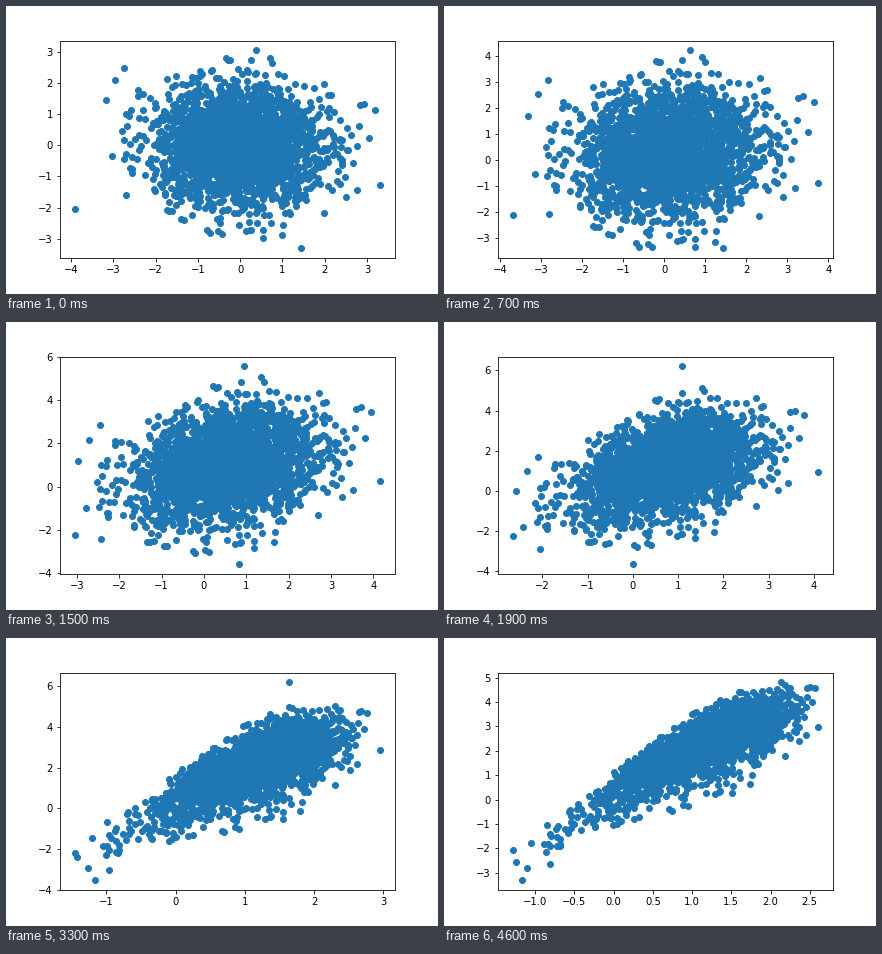
Write a matplotlib script that moves like this. It is 432 px wide and 288 px high and loops after 4.7 s.

```python
import numpy as np
import matplotlib.pyplot as plt
from matplotlib.animation import FuncAnimation

FRAMES = 47
COUNT = 2500


def ramp(p, start, end):
    """Smoothstep from 0 to 1 between start and end."""
    q = np.clip((p - start) / (end - start), 0, 1)
    return q * q * (3 - 2 * q)


def skewed(z, k):
    return z - k * (z * z - 1)


def rim(p):
    """Four stray points that bound the cloud: left, right, bottom, top."""
    fall = np.clip((p - 0.4) / 0.6, 0, 1)
    left = -3.9 + 2.62 * ramp(p, 0, 0.85)
    right = 3.3 + 0.85 * ramp(p, 0, 0.3) - 1.55 * (1 - (1 - fall) ** 2)
    bottom = -3.3 - 0.38 * np.sin(np.pi * p) ** 2
    top = min(3.04 + 7.7 * p, 6.2) - 1.4 * ramp(p, 0.7, 1)
    return np.array([
        (left, 0.62 * bottom),
        (right, -1.27 + 4.24 * ramp(p, 0, 0.8)),
        (1.43 - 2.6 * ramp(p, 0.2, 0.6), bottom),
        (0.37 + 1.76 * p, top),
    ])


def cloud(p, u, w):
    """Bend a round Gaussian (u, w) into a slanted, curved band."""
    grow = ramp(p, 0, 0.25)
    bend = ramp(p, 0.2, 0.85)
    thin = ramp(p, 0.2, 1.05)

    width = 1 + 0.14 * grow - 0.54 * bend
    x = 1.15 * ramp(p, 0, 0.65) + width * skewed(u, 0.09 * bend)

    lift = ramp(p, 0, 0.4) - 0.8 * bend
    slope = 0.2 * grow + 2.05 * bend
    height = 1 + 0.4 * grow - 0.72 * thin
    taper = np.exp(0.16 * bend * np.minimum(u, 0))
    y = (lift + slope * x - 0.33 * bend * x * x
         + height * taper * skewed(w, 0.1 * thin))
    return np.column_stack([x, y])


def sample():
    """Draw latent points whose path stays inside the rim."""
    rng = np.random.default_rng(11)
    u, w = rng.normal(scale=0.97, size=(2, COUNT + 200))
    keep = np.ones(u.size, bool)
    for p in np.linspace(0, 1, FRAMES):
        pts, edge = cloud(p, u, w), rim(p)
        keep &= ((pts > edge.min(0)) & (pts < edge.max(0))).all(axis=1)
    return u[keep][:COUNT], w[keep][:COUNT]


U, W = sample()
fig, ax = plt.subplots(figsize=(6, 4), dpi=72)
fig.subplots_adjust(left=0.125, right=0.9, bottom=0.125, top=0.88)


def draw(i):
    p = i / (FRAMES - 1)
    pts = np.vstack([cloud(p, U, W), rim(p)])
    ax.cla()
    ax.scatter(pts[:, 0], pts[:, 1], color="#1f77b4")


anim = FuncAnimation(fig, draw, frames=FRAMES, init_func=lambda: None,
                     interval=100, repeat=True, repeat_delay=0)
plt.show()
```
